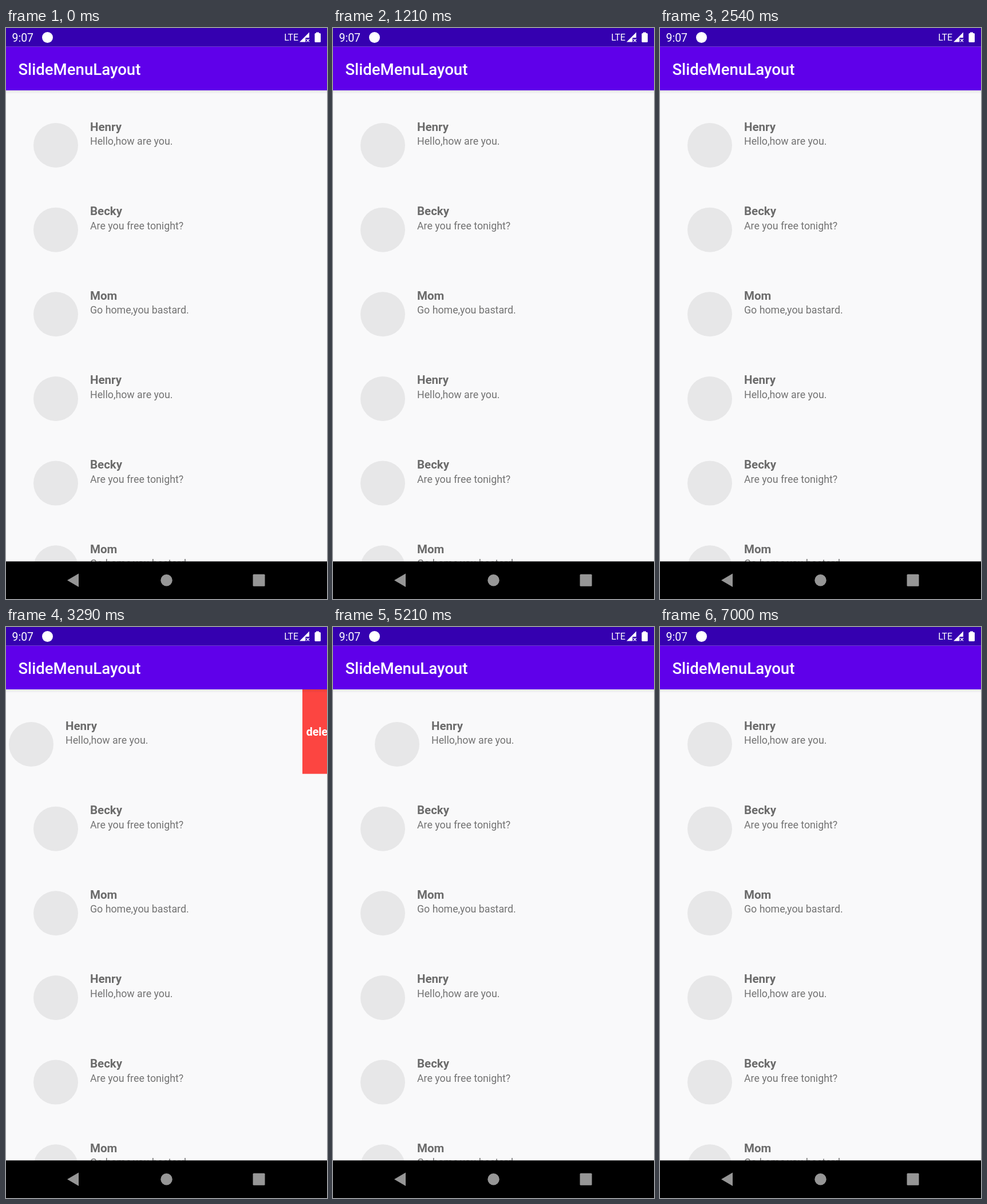
An HTML page with a canvas for the animation above (7040 ms loop, 561 by 998 pixels).

```html
<!DOCTYPE html>
<html lang="en">
<head>
<meta charset="utf-8">
<title>SlideMenuLayout</title>
<style>
html, body { margin: 0; width: 100%; height: 100%; overflow: hidden; background: #000; }
canvas { display: block; width: 561px; height: 998px; }
</style>
</head>
<body>
<canvas id="stage" width="561" height="998"></canvas>
<script>
const ctx = document.getElementById('stage').getContext('2d');
const W = 561, H = 998, LOOP = 7040;
const STATUS_H = 32.6, TOP = 109, BOTTOM = 932.3, ROW_H = 147.65;
const BUTTON_W = 68, MENU_W = BUTTON_W * 2;
const PURPLE = '#5f00ea', PAPER = '#f9f9fa';

const chats = [
  ['Henry', 'Hello,how are you.'],
  ['Becky', 'Are you free tonight?'],
  ['Mom', 'Go home,you bastard.']
];

// Swipe of the first row: [time in ms, horizontal offset]
const swipe = [
  [0, 0],
  [1790, 0], [1880, -48], [2080, -MENU_W], [2280, -MENU_W], [2540, 0],
  [3200, 0], [3290, -43], [3520, -MENU_W], [3900, -MENU_W], [4040, -102], [4290, 0],
  [5180, 0], [5210, 25], [5380, 60], [5670, 0],
  [LOOP, 0]
];

function slope(i) {
  const a = swipe[i - 1], b = swipe[i], c = swipe[i + 1];
  if (!a || !c) return 0;
  const before = (b[1] - a[1]) / (b[0] - a[0]);
  const after = (c[1] - b[1]) / (c[0] - b[0]);
  return before * after <= 0 ? 0 : 2 * before * after / (before + after);
}

// Monotone cubic interpolation between the swipe points
function offsetAt(t) {
  let i = 0;
  while (t >= swipe[i + 1][0]) i++;
  const [t0, x0] = swipe[i], [t1, x1] = swipe[i + 1];
  const span = t1 - t0, u = (t - t0) / span;
  const ease = u * u * (3 - 2 * u);
  return x0 + (x1 - x0) * ease
    + slope(i) * span * u * (1 - u) * (1 - u)
    - slope(i + 1) * span * u * u * (1 - u);
}

function rect(x, y, w, h, color) {
  ctx.fillStyle = color;
  ctx.fillRect(x, y, w, h);
}

function roundRect(x, y, w, h, r, color) {
  ctx.fillStyle = color;
  ctx.beginPath();
  ctx.roundRect(x, y, w, h, r);
  ctx.fill();
}

function disc(x, y, r, color) {
  ctx.fillStyle = color;
  ctx.beginPath();
  ctx.arc(x, y, r, 0, Math.PI * 2);
  ctx.fill();
}

function polygon(points, color) {
  ctx.fillStyle = color;
  ctx.beginPath();
  points.forEach(([x, y]) => ctx.lineTo(x, y));
  ctx.closePath();
  ctx.fill();
}

function label(text, x, y, size, weight, color, align = 'left') {
  ctx.font = `${weight} ${size}px Roboto, sans-serif`;
  ctx.textAlign = align;
  ctx.fillStyle = color;
  ctx.fillText(text, x, y);
}

function button(text, x, color) {
  rect(x, TOP, BUTTON_W, ROW_H, color);
  label(text, x + BUTTON_W / 2, 190, 19.6, 700, '#fff', 'center');
}

function row(i, dx) {
  const y = TOP + i * ROW_H;
  const [name, message] = chats[i % chats.length];
  disc(87 + dx, y + 96, 39, '#e7e7e8');
  label(name, 147 + dx, y + 70.5, 20.5, 700, '#6b6b6b');
  label(message, 147 + dx, y + 95, 17.8, 400, '#737373');
}

function statusBar() {
  rect(0, 0, W, STATUS_H, '#3500b0');
  label('9:07', 10.6, 23.5, 19.4, 400, '#fff');
  disc(72.5, 16.5, 9.5, '#fff');
  label('LTE', 486.2, 22, 15.9, 400, '#fff');

  polygon([[513, 24.5], [530, 7.5], [530, 17], [523.5, 17], [523.5, 24.5]], '#fff');
  ctx.strokeStyle = '#fff';
  ctx.lineWidth = 1.3;
  ctx.beginPath();
  ctx.moveTo(525.2, 19.2); ctx.lineTo(530, 24.4);
  ctx.moveTo(530, 19.2); ctx.lineTo(525.2, 24.4);
  ctx.stroke();

  rect(542, 7.5, 5, 3, '#fff');
  roundRect(539.5, 9, 10.5, 16, 1.5, '#fff');
}

function appBar() {
  const shade = ctx.createLinearGradient(0, TOP, 0, TOP + 6);
  shade.addColorStop(0, 'rgba(0,0,0,0.09)');
  shade.addColorStop(1, 'rgba(0,0,0,0)');
  rect(0, TOP, W, 6, shade);
  rect(0, STATUS_H, W, TOP - STATUS_H, PURPLE);
  label('SlideMenuLayout', 21.4, 81.5, 27.6, 500, '#fff');
}

function navBar() {
  const gray = '#969696';
  rect(0, BOTTOM, W, H - BOTTOM, '#000');
  polygon([[107, 965.2], [127, 953.5], [127, 977]], gray);
  disc(280.5, 965.2, 10.2, gray);
  roundRect(431.5, 954.7, 21, 21, 1.5, gray);
}

function draw(now) {
  const dx = Math.round(offsetAt(now % LOOP));
  rect(0, 0, W, H, PAPER);
  for (let i = 0; i < 6; i++) row(i, i ? 0 : dx);
  if (dx < 0) {
    button('delete', W + dx, '#fc4541');
    button('update', W + dx + BUTTON_W, PURPLE);
  }
  appBar();
  statusBar();
  navBar();
}

const start = performance.now();
function tick() {
  draw(performance.now() - start);
  requestAnimationFrame(tick);
}
tick();
</script>
</body>
</html>
```
